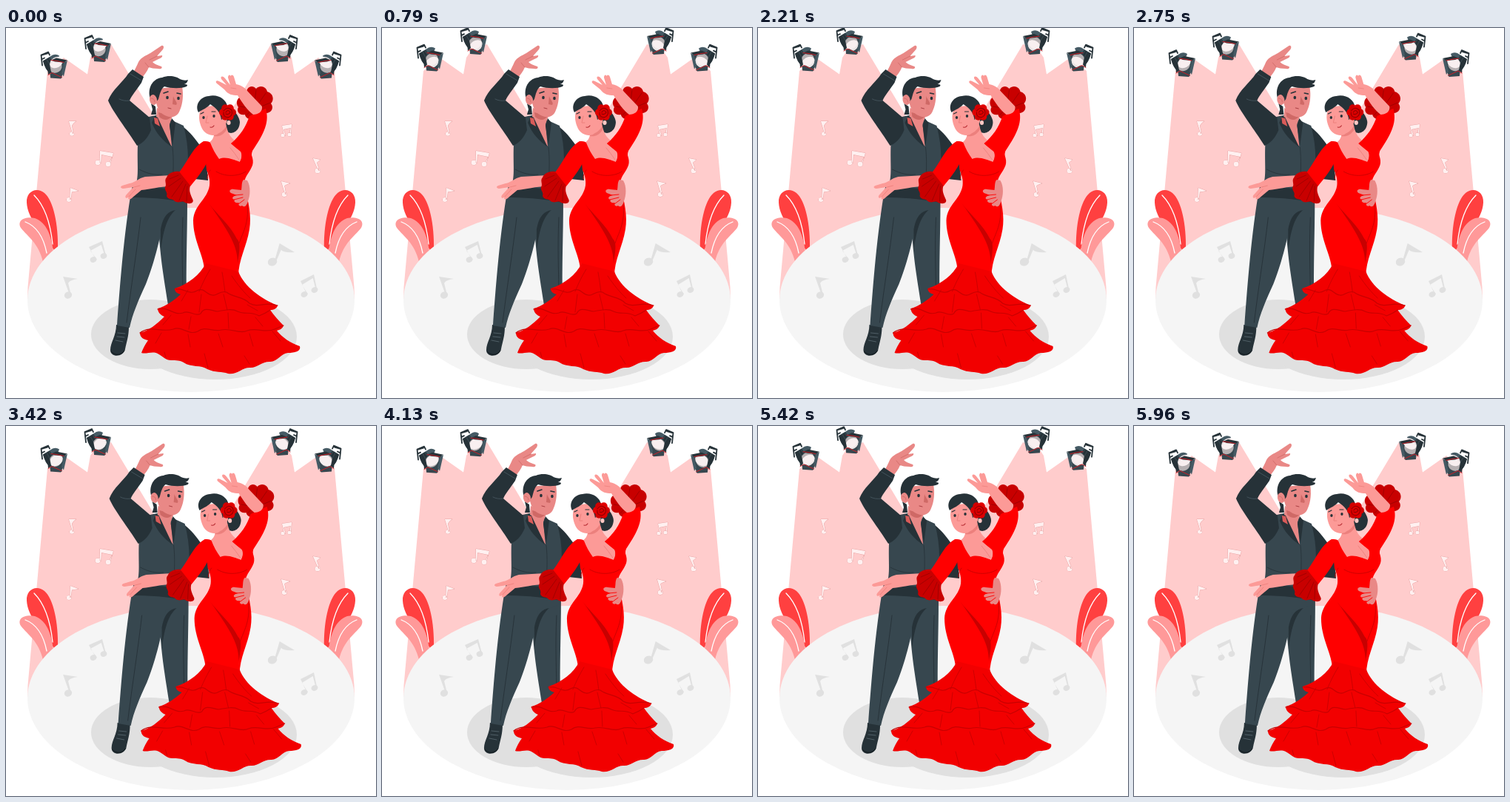
Animation, 500 px wide and 500 px high, one loop 6 s. Source, as an HTML page with a canvas:

```html
<!DOCTYPE html>
<html lang="en">
<head>
<meta charset="utf-8">
<title>Flamenco couple</title>
<style>
html, body { margin: 0; width: 100%; height: 100%; overflow: hidden; background: #fff; }
canvas { display: block; width: 500px; height: 500px; }
</style>
</head>
<body>
<canvas id="stage"></canvas>
<script>
const canvas = document.getElementById('stage');
const ratio = window.devicePixelRatio || 1;
canvas.width = canvas.height = 500 * ratio;
const ctx = canvas.getContext('2d');
const LOOP = 6000;

const C = {
  dark: '#263238', slate: '#37474f', grey: '#455a64',
  man: '#e98886', manShade: '#cf6966', woman: '#fc9a97', womanShade: '#ec807d',
  red: '#ff0000', skirt: '#f20000', deep: '#c80000', beam: '#ffcccc'
};

const fill = (d, color) => { ctx.fillStyle = color; ctx.fill(new Path2D(d)); };
function stroke(d, color, width = 1) {
  ctx.strokeStyle = color;
  ctx.lineWidth = width;
  ctx.lineCap = ctx.lineJoin = 'round';
  ctx.stroke(new Path2D(d));
}
function oval(x, y, rx, ry, color, turn = 0) {
  ctx.beginPath();
  ctx.ellipse(x, y, rx, ry, turn, 0, 7);
  ctx.fillStyle = color;
  ctx.fill();
}
function moved(x, y, draw) {
  ctx.save();
  ctx.translate(x, y);
  draw();
  ctx.restore();
}
function bothSides(draw) {
  draw();
  ctx.save();
  ctx.translate(500, 0);
  ctx.scale(-1, 1);
  draw();
  ctx.restore();
}

// Horizontal sway, one step per tenth of the loop
const SWAY = [0, -1, 2, -4, 4, -4, 4, -4, 2, -1, 0];
function swayAt(t) {
  const p = t / LOOP * 10, i = Math.floor(p);
  return SWAY[i] + (SWAY[i + 1] - SWAY[i]) * (p - i);
}
const liftAt = t => -5 + 5 * Math.cos(t / 1500 * 2 * Math.PI);

function beams() {
  fill('M56 58 L78 40 L110 62.5 L114 40 L122 28 L142 22 L272 239 L290 366 L29 366 L29.5 350Z', C.beam);
}

function plants() {
  fill('M65 300 C50 278 29 258 28 236 C27 221 41 214 52 223 C64 233 71 266 70 300Z', '#ff4040');
  stroke('M38 226 C52 240 60 264 63 292', '#fff', 1.3);
  fill('M50 316 C44 290 29 282 20 270 C14 259 27 254 39 257 C55 263 61 280 64 302Z', '#ff9999');
  stroke('M26 262 C42 268 51 284 55 304', '#fff', 1.3);
}

function lampBack() {
  stroke('M3 19 L1.5 5 L11 1 L13 5 M3 5 L10 3 M2 11 L6 9', C.dark, 1.8);
  fill('M4 13 L17 5 Q22 3 26 6 L22 16 L13 29 Q8 26 4 13Z', C.grey);
  fill('M4 13 L13 8 L20 18 L13 29 Q7 25 4 13Z', C.dark);
  stroke('M9 11 L16 23 M12 9 L19 19', C.slate, 1.2);
  fill('M12 18 L18 12 L35 13 L29 36 L14 35Z', C.slate);
  oval(21, 21, 9, 8, '#b6b0b2', -0.6);
}
function lampFront() {
  fill('M15 12 L22 9 L37 12 L31 15 L20 14Z', C.dark);
  fill('M14 30 L18 29 L30 35 L28 37 L14 36Z', C.slate);
  fill('M32 16 L37 12 L32 34 L29 30Z', C.grey);
  fill('M10 20 L13 18 L15 28 L11 32Z', C.dark);
  stroke('M15 12 L23 13 L32 15 M11 32 L16 29 L29 35', '#d81c24', 0.9);
}
function lamp(x, y, lift) {
  moved(x, y + lift, lampBack);
  moved(x, y, () => oval(22, 15, 9.5, 7, 'rgba(255,246,246,.9)', -0.55));
  moved(x, y + lift, lampFront);
}

// A note is a head, a stem top and a flag tip
function single(hx, hy, tx, ty, fx, fy, r, paint) {
  const sx = hx + r * 0.75, w = r * 0.36;
  const kx = tx + (sx - tx) * 0.35 + w, ky = ty + (hy - ty) * 0.35;
  paint(`M${sx - w} ${hy} L${tx - w} ${ty} L${fx} ${fy} Q${kx + 3} ${fy + 1} ${kx} ${ky} L${sx} ${hy}Z`, hx, hy, r);
}
function pair(ax, ay, bx, by, cx, cy, dx, dy, r, paint) {
  const s = r * 0.75;
  paint(`M${ax + s} ${ay} L${cx} ${cy} L${dx} ${dy} L${bx + s} ${by} L${bx + s - 1.7} ${by} L${dx - 1.3} ${dy + 5} L${cx + 2} ${cy + 5} L${ax + s + 1.7} ${ay}Z`, ax, ay, r);
  paint('', bx, by, r);
}
function floorNote(d, x, y, r) {
  fill(d, '#e0e0e0');
  oval(x, y, r, r * 0.85, '#e0e0e0', -0.4);
}
function airNote(d, x, y, r) {
  const head = `M${x - r} ${y} a${r} ${r * .9} 0 1 0 ${2 * r} 0 a${r} ${r * .9} 0 1 0 ${-2 * r} 0`;
  stroke(d + head, '#eaa6a6', 1);
  fill(d + head, '#fff0f0');
}

function airNotes() {
  single(89, 143, 86, 126, 95, 126, 3, airNote);
  pair(124, 182, 138, 184, 127, 166, 145, 169, 3.5, airNote);
  single(85, 232, 88, 216, 98, 220, 3.2, airNote);
  pair(374, 145, 383, 144, 373, 132, 386, 130, 2.6, airNote);
  single(421, 193, 416, 176, 425, 178, 3.6, airNote);
  single(376, 225, 373, 207, 384, 210, 3.4, airNote);
}

function floor() {
  oval(250, 367.5, 221, 124.5, '#f5f5f5');
  single(84, 361, 79, 336, 97, 339, 5.3, floorNote);
  pair(118, 313, 132, 308, 112, 296, 130, 288, 4.4, floorNote);
  single(360, 316, 372, 291, 390, 303, 6.4, floorNote);
  pair(403, 360, 417, 354, 398, 342, 416, 333, 4.6, floorNote);
  oval(195, 414, 80, 47, '#e0e0e0');
  oval(283, 417, 110, 58, '#e0e0e0');
}

function man() {
  // shoe and trousers
  fill('M149 401 L166 404 C166 416 163 424 161 434 C159 445 141 446 141 435 C141 425 149 416 149 401Z', C.dark);
  stroke('M151 412 L161 413 M150 417 L160 418 M148 422 L158 424', '#55656d', 0.9);
  stroke('M142 437 C147 443 155 443 160 436', '#0f171b', 1);
  fill('M204 236 L245 234 C245 280 243 320 244 372 L219 374 C213 335 209 315 206 270Z', C.slate);
  fill('M168 228 L244 228 L244 240 C235 246 225 247 214 249 C209 286 198 324 189 346 C179 368 171 386 167 405 L150 402 C153 362 158 290 168 228Z', C.slate);
  fill('M209 272 C213 252 220 248 229 246 C217 256 212 276 209 302Z', C.dark);
  stroke('M182 256 C177 300 169 350 163 398 M239 256 C237 300 239 330 239 365', C.dark, 0.9);
  fill('M171 213 L218 211 L245 221 L245 236 C215 230 190 229 168 229Z', C.dark);

  // far sleeve
  fill('M233 130 C247 136 262 157 270 172 L273 206 L255 204 L243 175Z', C.dark);

  // torso
  fill('M193 120 L207 117 L240 132 C244 148 246 162 246 178 L241 214 L217 217 L175 214 C180 199 177 185 178 158Z', C.slate);

  // raised hand and sleeve
  fill('M171 63 C174 56 177 51 179 46 C183 39 190 37 195 34 L210 24 C213 23 214 26 212 29 L204 38 L211 37 C212 39 209 41 206 42 L198 46 C201 49 205 50 210 52 C212 54 209 56 206 55 C200 55 196 54 193 53 C191 58 187 64 182 69Z', C.man);
  stroke('M204 38 L194 43 M193 53 L188 47', C.manShade, 0.8);
  fill('M171 56 L186 66 L183 74 C177 83 170 91 167 98 L194 121 L196 138 C191 150 184 156 177 159 C164 138 144 113 138 98 C143 84 158 73 165 62Z', C.dark);
  stroke('M168 62 L183 71 M167 98 C162 99 157 98 153 96', '#4a5a62', 0.8);

  // neck and shirt opening
  fill('M204 108 L226 116 L221 130 L224 160 C213 148 206 136 203 121Z', C.man);
  fill('M206 114 L224 119 C219 126 213 125 207 120Z', C.manShade);
  fill('M201 119 L205 121 L213 138 L224 161 C212 152 203 143 197 128Z', C.dark);
  fill('M200 121 L205 122 L208 133 L201 129Z', '#d95b59');
  fill('M224 122 L229 128 L225 159 L221 132Z', C.dark);
  stroke('M225 161 C227 178 226 196 225 212', C.dark, 0.8);
  stroke('M180 191 C191 197 201 199 211 198', C.dark, 0.8);

  // head
  fill('M203 82 L238 79 C240 90 239 102 235 111 C232 120 224 122 217 119 C209 116 205 110 203 101Z', C.man);
  fill('M194 92 C192 78 200 68 211 67 C221 63 231 66 235 69 C240 71 243 71 246 70 C245 74 243 75 241 76 C245 76 246 77 244 79 C237 82 224 82 214 79 C209 83 208 89 206 96 L200 104 L196 100Z', C.dark);
  fill('M196 102 L202 106 L203 117 L196 117 L198 110Z', C.dark);
  oval(199, 97, 5, 7, C.man, -0.2);
  stroke('M196 95 Q201 95 201 100', C.manShade, 0.8);
  fill('M226 92 C227 97 233 101 230 104 L225 103Z', C.manShade);
  oval(218, 94, 1.8, 2.2, C.dark);
  oval(233, 95, 1.8, 2.2, C.dark);
  stroke('M213 88 L219 86 M231 88 L236 89', C.dark, 1.6);
  stroke('M219 108 L223 109', '#a93f42', 1);
}

function ruffle(d, folds) {
  fill(d, C.deep);
  stroke(folds, '#9e0000', 0.9);
}

function skirt() {
  fill('M270 318 C262 334 246 346 228 352 C228 357 232 359 236 360 C227 368 216 376 205 379 C205 384 209 388 214 390 C204 400 193 409 181 412 C181 418 186 421 192 422 C188 428 185 433 183 439 C190 441 198 436 205 440 C212 444 216 449 223 449 C230 449 235 449 240 452 C250 459 264 455 272 461 C283 466 292 464 300 467 C312 469 319 459 329 459 C339 460 345 451 356 451 C366 452 371 440 381 439 C390 439 399 437 397 430 C385 426 373 418 366 409 C370 408 374 406 375 402 C369 396 362 388 357 381 C362 381 366 379 367 375 C345 366 322 350 314 329Z', C.skirt);
  stroke('M228 353 C240 350 247 362 258 355 C268 350 270 360 279 361 C284 363 289 354 298 357 C308 365 320 362 329 372 C342 379 350 369 367 375', C.deep, 1.2);
  stroke('M205 380 C220 376 226 389 239 385 C248 380 255 391 263 386 C268 376 277 382 286 383 C296 381 306 379 313 383 C324 388 330 382 342 389 C350 386 354 383 357 381', C.deep, 1.2);
  stroke('M181 412 C195 401 210 412 226 407 C237 402 247 416 259 410 C269 402 279 411 291 408 C304 405 316 414 326 409 C339 404 350 413 363 407 L375 402', C.deep, 1.2);
  stroke('M276 326 C270 336 266 344 261 356 M292 330 C294 341 295 349 296 357 M305 335 C313 347 322 358 330 365', C.deep, 0.9);
  stroke('M246 354 L237 369 M264 360 L261 384 M294 360 L299 381 M326 374 L340 382', C.deep, 0.9);
  stroke('M223 388 L212 401 M250 390 L247 407 M300 385 L301 406 M337 391 L347 403 M210 412 L202 426 M246 414 L249 431 M287 413 L293 431 M329 413 L334 430 M360 410 L371 423 M214 438 L216 445 M268 440 L273 459 M322 443 L329 454', C.deep, 0.9);
}

function flower() {
  for (let i = 0; i < 6; i++) {
    const a = i * Math.PI / 3;
    oval(299.5 + 6.5 * Math.cos(a), 114 + 6.5 * Math.sin(a), 5, 5, i % 2 ? '#e00000' : '#d00000');
  }
  oval(299.5, 114, 7, 7, '#dc0000');
  stroke('M294 112 Q299 105 305 111 Q307 119 300 121 Q293 120 294 114 M297 114 Q300 109 303 114 Q301 118 297 116', '#8e0000', 1.1);
}

function woman() {
  // hair and neck
  fill('M289 101 C304 105 316 118 316 128 C315 139 308 143 299 140 L287 130Z', C.dark);
  oval(304, 133, 9, 9, C.dark);
  fill('M281 130 L297 128 C299 142 304 151 318 158 L326 182 L277 190 L270 157 C282 152 282 145 281 130Z', C.woman);
  fill('M281 143 C288 144 294 139 298 132 L298 138 C293 145 288 147 281 146Z', C.womanShade);

  // raised sleeve and forearm
  ruffle('M325 90 C324 79 333 76 338 82 C344 76 352 80 353 86 C361 88 363 97 358 102 C363 108 358 116 350 115 C346 121 338 119 335 121 C328 126 323 120 323 117 C315 119 311 112 314 107 C309 100 314 91 320 94Z',
    'M338 84 L336 99 M351 88 L342 101 M357 101 L345 106 M316 106 L328 108 M325 118 L332 110');
  fill('M351 109 C356 126 350 141 333 166 C331 175 321 171 304 156 C316 146 324 134 329 119Z', C.red);
  fill('M300 85 C304 79 303 76 303 69 C303 63 306 62 308 66 L311 76 C320 78 324 82 327 86 L346 106 C347 113 341 117 334 117 C327 112 319 101 313 91 C306 91 300 90 295 83 L285 75 C282 72 285 70 288 72 L298 77 L291 69 C289 65 293 64 296 68 L303 77 L300 67 C300 63 303 62 304 66 L308 79Z', C.woman);
  stroke('M304 81 L311 82', C.womanShade, 0.8);

  // dress
  fill('M267 153 C271 153 274 153 276 155 C279 163 283 170 288 177 C297 173 308 178 316 181 C319 176 319 172 318 167 L326 161 C333 171 336 181 332 188 C328 197 321 202 322 213 C328 236 332 254 329 272 C325 296 314 313 314 336 C300 345 279 337 268 325 C266 305 253 286 253 260 C254 239 272 232 275 213 C276 206 274 198 271 192Z', C.red);
  fill('M304 156 L333 160 L331 182 L316 181 C319 176 319 170 317 167Z', C.red);
  fill('M267 153 C276 155 279 160 276 171 C271 187 259 202 249 214 L233 196 C244 184 252 161 267 153Z', C.red);
  stroke('M276 192 C273 196 272 199 272 204 M284 194 C299 203 317 199 324 194', C.deep, 0.9);
  stroke('M303 162 Q309 169 315 178', C.womanShade, 0.9);
  fill('M274 237 C286 253 303 266 312 285 C318 290 315 305 313 318 C313 296 304 279 274 237Z', C.deep);
  stroke('M326 238 C329 264 319 278 315 291', C.deep, 0.9);
  skirt();

  // near arm
  fill('M223 199 L188 201 C179 203 174 209 167 210 L157 213 C153 215 156 217 159 217 L172 215 L162 226 C160 230 163 231 166 228 L165 230 C166 233 169 231 171 229 L183 219 C195 218 208 214 222 214Z', C.woman);
  stroke('M173 215 L181 213 M166 228 L175 218', C.womanShade, 0.9);
  ruffle('M234 194 C225 193 219 197 217 202 C213 206 218 211 215 215 C214 220 219 222 217 227 C219 233 225 230 228 234 C234 238 237 232 242 236 C249 239 255 236 252 231 C249 224 247 220 249 213Z',
    'M233 199 L221 204 M236 203 L220 214 M239 207 L224 228 M243 211 L234 233 M245 214 L244 234');

  // partner's hand on her waist, fingers spread to the left
  fill('M326 206 C331 214 330 227 327 234 C325 241 322 243 319 240 C316 242 313 239 315 236 C311 237 307 235 309 232 C304 231 306 227 312 226 L304 223 C300 220 304 217 308 218 L318 219 C319 214 318 208 321 205Z', C.man);
  stroke('M309 226 L320 225 M308 232 L320 229 M314 238 L322 232', C.red, 0.9);

  // face
  fill('M262 113 C270 104 284 102 292 112 C296 126 293 139 285 144 C277 147 269 143 265 136 C261 128 260 120 262 113Z', C.woman);
  fill('M260 114 C255 104 262 93 274 92 C287 89 298 97 299 106 L295 124 L291 124 C290 114 284 108 276 103 C272 108 266 110 260 114Z', C.dark);
  oval(295, 125, 3.5, 5, C.woman);
  oval(301, 128, 2.6, 3, '#ffc9c5');
  flower();
  oval(267, 121, 1.7, 2, C.dark);
  oval(281, 119, 1.7, 2, C.dark);
  stroke('M263 116 L267 114 M278 113 L283 113', C.dark, 1.2);
  stroke('M272 119 L270 128 L274 128', C.womanShade, 1);
  stroke('M276 134 Q279 135 281 132', '#b72d33', 1.2);
}

function draw(t) {
  ctx.setTransform(ratio, 0, 0, ratio, 0, 0);
  ctx.fillStyle = '#fff';
  ctx.fillRect(0, 0, 500, 500);
  const lift = liftAt(t);
  bothSides(beams);
  airNotes();
  bothSides(() => {
    plants();
    lamp(105, 9, lift);
    lamp(46, 31.5, lift);
  });
  floor();
  moved(swayAt(t), 0, () => { man(); woman(); });
}

const start = performance.now();
function frame() {
  draw((performance.now() - start) % LOOP);
  requestAnimationFrame(frame);
}
frame();
</script>
</body>
</html>
```
